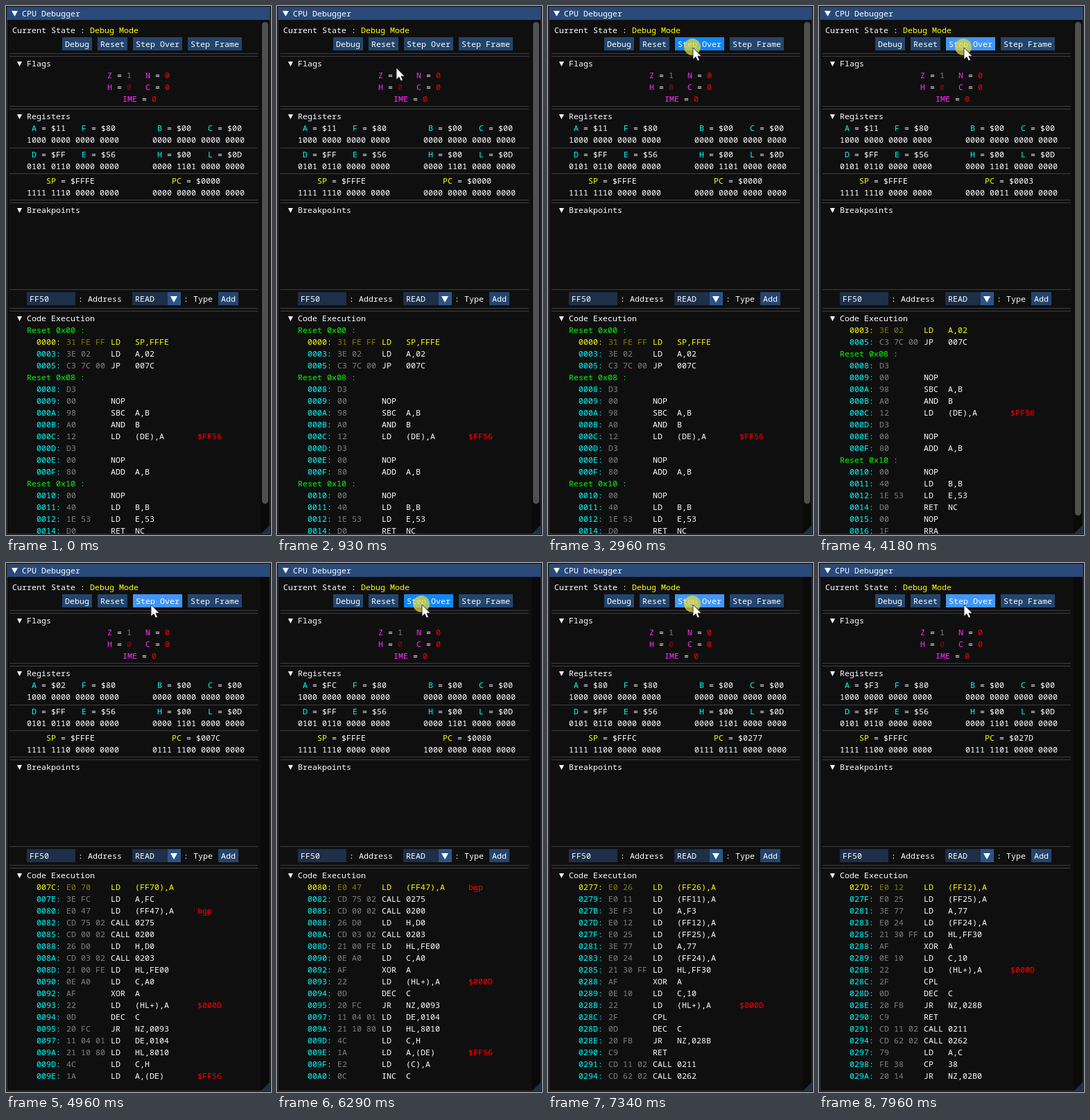
These frames come from a looping animation (382x762 px, 8 s). An HTML page:

```html
<!DOCTYPE html>
<html lang="en">
<head>
<meta charset="utf-8">
<title>CPU Debugger</title>
<style>
  html, body { margin: 0; width: 100%; height: 100%; overflow: hidden; background: #0f0f0f; }
  svg { display: block; width: 382px; height: 762px; }
  text { font: 11.667px "Noto Sans Mono", "DejaVu Sans Mono", monospace; white-space: pre; fill: #fff; }
</style>
</head>
<body>
<svg id="stage" viewBox="0 0 382 762">
  <g id="panel"></g>
  <g id="state"></g>
  <rect x="1.5" y="1.5" width="379" height="759" fill="none" stroke="#3e3e47"/>
  <circle id="spot" cx="208" cy="59" r="12" fill="#e2da3c" opacity=".75"/>
  <path id="cursor" d="M0 0V17L4 13.3L6.6 19L9.4 17.8L6.9 12.2H12Z" fill="#fff" stroke="#111" stroke-width=".8"/>
</svg>
<script>
const LOOP = 8000, ROW = 17, VISIBLE = 17;
const YELLOW = '#ff0', CYAN = '#0ff', RED = '#f00', GREY = '#808080', MAGENTA = '#ff30ff';
const BUTTON = '#23456d', HOVER = '#4296fa', ACTIVE = '#0f87fa', FRAME = '#1d2f49';
const $ = id => document.getElementById(id);

// y is the vertical middle of the row
const text = (x, y, s, fill = '#fff') => `<text x="${x}" y="${y + 4}" style="fill:${fill}">${s}</text>`;
const rect = (x, y, w, h, fill, r = 0) =>
  `<rect x="${x}" y="${y}" width="${w}" height="${h}" rx="${r}" fill="${fill}"/>`;
const line = y => rect(5, y, 358, 1, '#3e3e47');
const down = (x, y, w, h) => `<path d="M${x} ${y}h${w}l${-w / 2} ${h}z" fill="#fff"/>`;
const button = (x, y, s, fill = BUTTON) => rect(x, y, s.length * 7 + 8, 19, fill) + text(x + 4, y + 10, s);
const section = (y, s) => line(y - 15) + line(y - 11) + down(16, y - 3, 7, 7) + text(30, y, s);
const pair = (x, y, name, value, color, valueColor) =>
  text(x, y, name, color) + text(x + name.length * 7, y, ' = ') +
  text(x + name.length * 7 + 21, y, value, valueColor);
const hex = (n, len) => n.toString(16).toUpperCase().padStart(len, '0');
const bits = n => (n & 255).toString(2).padStart(8, '0').replace(/^(.{4})/, '$1 ') + ' 0000 0000';

const programs = [
  [0x00, `31 FE FF:LD SP,FFFE|3E 02:LD A,02|C3 7C 00:JP 007C|D3|00:NOP|98:SBC A,B|A0:AND B|12:LD (DE),A|D3|
00:NOP|80:ADD A,B|00:NOP|40:LD B,B|1E 53:LD E,53|D0:RET NC|00:NOP|1F:RRA|42:LD B,D|1C:INC E`],
  [0x7c, `E0 70:LD (FF70),A|3E FC:LD A,FC|E0 47:LD (FF47),A|CD 75 02:CALL 0275|CD 00 02:CALL 0200|26 D0:LD H,D0|
CD 03 02:CALL 0203|21 00 FE:LD HL,FE00|0E A0:LD C,A0|AF:XOR A|22:LD (HL+),A|0D:DEC C|20 FC:JR NZ,0093|
11 04 01:LD DE,0104|21 10 80:LD HL,8010|4C:LD C,H|1A:LD A,(DE)|E2:LD (C),A|0C:INC C|CD C6 03:CALL 03C6`],
  [0x275, `3E 80:LD A,80|E0 26:LD (FF26),A|E0 11:LD (FF11),A|3E F3:LD A,F3|E0 12:LD (FF12),A|E0 25:LD (FF25),A|
3E 77:LD A,77|E0 24:LD (FF24),A|21 30 FF:LD HL,FF30|AF:XOR A|0E 10:LD C,10|22:LD (HL+),A|2F:CPL|0D:DEC C|
20 FB:JR NZ,028B|C9:RET|CD 11 02:CALL 0211|CD 62 02:CALL 0262|79:LD A,C|FE 38:CP 38|20 14:JR NZ,02B0`]
].map(([addr, source]) => source.replace(/\n/g, '').split('|').map(item => {
  const [bytes, code = ''] = item.split(':'), [op, arg = ''] = code.split(' ');
  const row = { addr, bytes, op, arg };
  addr += bytes.split(' ').length;
  return row;
}));

const notes = { '(DE)': '$FF56', '(HL+)': '$000D', '(FF47)': 'bgp' };
const noteFor = arg => notes[(arg.match(/\(.*\)/) || [''])[0]] || '';

// Program counter and accumulator after each click
const steps = [[0, 0x11], [3, 0x11], [5, 2], [0x7c, 2], [0x7e, 2], [0x80, 0xfc], [0x82, 0xfc],
  [0x275, 0xfc], [0x277, 0x80], [0x279, 0x80], [0x27b, 0x80], [0x27d, 0xf3]];

// Spot shown, button down, spot hidden; the step runs shortly before the last
const clicks = [[2960, 2960, 3320], [4180, 4215, 4370], [4770, 4805, 4960], [5550, 5580, 5680],
  [5940, 5970, 6060], [6290, 6290, 6420], [6620, 6650, 6780], [6980, 7010, 7110],
  [7340, 7370, 7470], [7600, 7630, 7710], [7850, 7880, 7960]];
const RELEASE = 50;

// Cursor tip: time, x, y
const path = [[430, 271, 577], [670, 174, 86], [900, 174, 86], [1100, 161, 104], [1310, 173, 121],
  [1570, 174, 121], [1790, 190, 86], [2130, 209, 60]];

function drawPanel() {
  const flag = (x, y, name, value, color = RED) => pair(x, y, name, value, MAGENTA, color);
  const reg = (x, y, name, value) => pair(x, y, name, value, CYAN);
  $('panel').innerHTML =
    rect(0, 0, 382, 762, '#0f0f0f') + rect(1, 1, 380, 19, '#294a7a') + rect(367, 20, 14, 741, '#0a0a0a') +
    down(8, 7, 9, 8) + text(23, 11, 'CPU Debugger') +
    text(9, 35, 'Current State :') + text(121, 35, 'Debug Mode', YELLOW) +
    button(81, 45, 'Debug') + button(132, 45, 'Reset') + button(262, 45, 'Step Frame') +
    section(83, 'Flags') + flag(146, 100, 'Z', '1', GREY) + flag(201, 100, 'N', '0') +
    flag(146, 117, 'H', '0', '#8c0c0c') + flag(201, 117, 'C', '0') + flag(168, 134, 'IME', '0') +
    section(159, 'Registers') + reg(109, 176, 'F', '$80') + reg(218, 176, 'B', '$00') + reg(291, 176, 'C', '$00') +
    text(30, 193, bits(0x80)) + text(211, 193, bits(0)) + line(204) +
    reg(37, 214, 'D', '$FF') + reg(109, 214, 'E', '$56') + reg(218, 214, 'H', '$00') + reg(291, 214, 'L', '$0D') +
    text(30, 231, bits(0x56)) + text(211, 231, bits(0x0d)) + line(241) +
    section(294, 'Breakpoints') + line(408) +
    rect(30, 412, 70, 19, FRAME) + text(34, 422, 'FF50') + text(104, 422, ': Address') +
    rect(182, 412, 51, 19, FRAME) + text(186, 422, 'READ') + rect(233, 412, 19, 19, '#2b5486') +
    down(237, 418, 10, 9) + text(256, 422, ': Type') + button(306, 412, 'Add') +
    section(450, 'Code Execution') + '<path d="M381 747V761H367Z" fill="#1c314a"/>';
}

function drawState(step, fill) {
  const [pc, a] = steps[step];
  const sp = pc < 0x275 ? 0xfffe : 0xfffc;
  const program = programs[pc < 0x7c ? 0 : pc < 0x275 ? 1 : 2];
  const first = program.findIndex(row => row.addr === pc);
  let rows = 0, out = button(183, 45, 'Step Over', fill) +
    pair(37, 176, 'A', '$' + hex(a, 2), CYAN) +
    pair(58, 252, 'SP', '$' + hex(sp, 4), YELLOW) + pair(239, 252, 'PC', '$' + hex(pc, 4), YELLOW) +
    text(30, 269, bits(sp)) + text(211, 269, bits(pc));
  const nextY = () => 467 + ROW * rows++;
  for (const { addr, bytes, op, arg } of program.slice(first, first + VISIBLE)) {
    if (addr < 0x40 && addr % 8 === 0) out += text(30, nextY(), `Reset 0x${hex(addr, 2)} :`, '#0f0');
    const y = nextY(), on = addr === pc, color = on ? YELLOW : '#fff';
    out += text(44, y, hex(addr, 4) + ':', on ? YELLOW : CYAN) + text(87, y, bytes, on ? '#808000' : GREY) +
      text(151, y, op, color) + text(186, y, arg, color) + text(276, y, noteFor(arg), RED);
  }
  // The scroll grab shows only while the listing overflows
  if (rows > VISIBLE) out += rect(369, 23, 9, 694 + (20 - rows) * ROW, '#4f4f4f', 4.5);
  $('state').innerHTML = out;
}

function cursorAt(t) {
  const i = path.findIndex(p => p[0] > t);
  if (i < 0) return path[path.length - 1].slice(1);
  const [t0, x0, y0] = path[i - 1], [t1, x1, y1] = path[i];
  const k = (t - t0) / (t1 - t0);
  return [x0 + (x1 - x0) * k, y0 + (y1 - y0) * k];
}

let shown = '';
function frame(now) {
  const t = now % LOOP, visible = t >= path[0][0];
  $('cursor').style.display = visible ? '' : 'none';
  let hover = false;
  if (visible) {
    const [x, y] = cursorAt(t);
    $('cursor').setAttribute('transform', `translate(${Math.round(x)} ${Math.round(y)})`);
    hover = x >= 183 && x < 254 && y >= 45 && y < 64;
  }
  const step = clicks.filter(c => t >= c[2] - RELEASE).length;
  const held = clicks.some(c => t >= c[1] && t < c[2] - RELEASE);
  $('spot').style.display = clicks.some(c => t >= c[0] && t < c[2]) ? '' : 'none';
  const fill = held ? ACTIVE : hover ? HOVER : BUTTON;
  if (shown !== step + fill) {
    drawState(step, fill);
    shown = step + fill;
  }
  requestAnimationFrame(() => frame(performance.now()));
}

drawPanel();
frame(performance.now());
</script>
</body>
</html>
```
